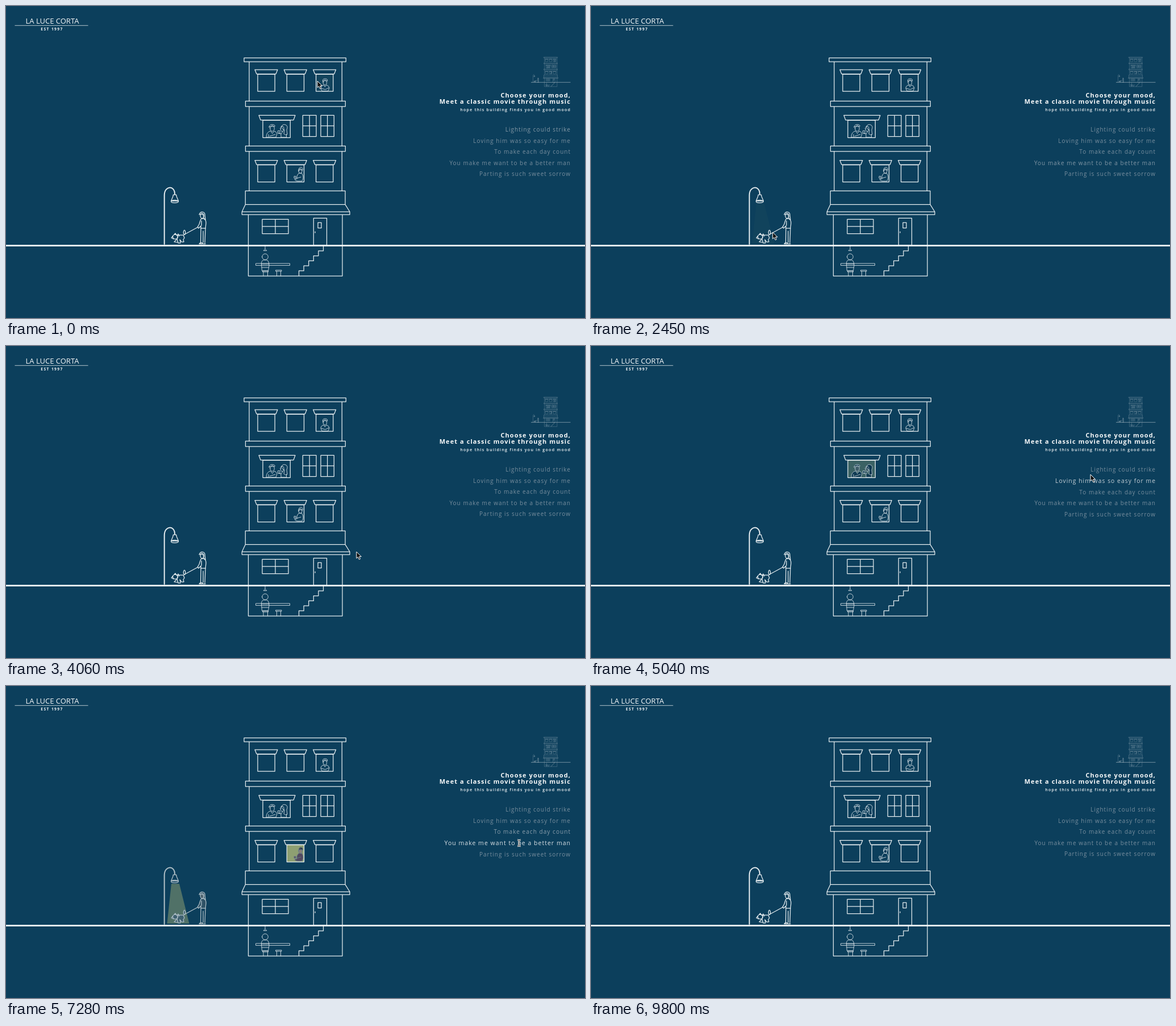
Animation of 1019 by 549 pixels, one loop 9940 ms. Source, as an HTML page:

```html
<!DOCTYPE html>
<html lang="en">
<head>
<meta charset="utf-8">
<title>Mood building</title>
<style>
  html, body { margin: 0; width: 100%; height: 100%; overflow: hidden; background: #0c3f5c; }
  svg { display: block; width: 100%; height: 100%; }
  text { font-family: "Open Sans", "Noto Sans", sans-serif; fill: #f6f8f9; }
  .art { fill: none; stroke: #e6edf0; stroke-width: 1.25; stroke-linejoin: round; stroke-linecap: round; }
  .fine { stroke-width: .8; }
  .bold { stroke-width: 2; }
  .thumb, .thumb * { stroke: #8fa5b3; stroke-width: 3.4; }
  .thumb .fine { stroke-width: 2; }
</style>
</head>
<body>
<svg id="stage" viewBox="0 0 1019 549" xmlns="http://www.w3.org/2000/svg"></svg>
<script>
const LOOP = 9940, STEP = 70;
const FADE = 550, ROW_FADE = 300, SETTLE = 100;
const ROW_TOP = 218, ROW_GAP = 19.4;
const GLOW = '#dcda80';

const rows = [
  'Lighting could strike',
  'Loving him was so easy for me',
  'To make each day count',
  'You make me want to be a better man',
  'Parting is such sweet sorrow'
];

// where the pointer rests on a mood, in the house and in the list
const house = [[548, 132], [485, 217], [510, 295], [318, 400], [455, 446]];
const list = rows.map((_, i) => [903, ROW_TOP + i * ROW_GAP]);
const visit = (row, place, on, off) => ({ row, on, off, at: place[row] });

const visits = [
  visit(0, house, -60, 1210),
  visit(1, house, 1230, 1760),
  visit(3, house, 2400, 2830),
  visit(4, house, 2860, 3500),
  visit(1, list, 4870, 5150),
  visit(0, list, 5180, 6020),
  visit(2, list, 6140, 7050),
  visit(3, list, 7070, 7860),
  visit(4, list, 7910, 8500),
  visit(4, house, 8850, 9150),
  { on: 9600, off: LOOP, at: [498, 552] }
];
visits[4].at = [879, 226]; // rests in the gap above its line

const ease = k => k * k * (3 - 2 * k);
const clamp = k => Math.max(0, Math.min(1, k));

// ---- shapes ----
const path = (d, extra = '') => `<path d="${d}" ${extra}/>`;
const box = (x, y, r, b) => `M${x} ${y}H${r}V${b}H${x}Z`;
const oval = (x, y, rx, ry = rx) => `M${x - rx} ${y}a${rx} ${ry} 0 1 0 ${2 * rx} 0a${rx} ${ry} 0 1 0 ${-2 * rx} 0Z`;
const cross = (x, y, r, b) => box(x, y, r, b) + `M${(x + r) / 2} ${y}V${b}M${x} ${(y + b) / 2}H${r}`;
const shade = (x, y, w, h = 7.5) => `M${x} ${y}h${w}l-3 ${h}h${6 - w}Z`;

const awnings = [112, 271.5].flatMap(y => [0, 1, 2].map(i => {
  const x = 438 + i * 51.3;
  return shade(x, y, 40) + box(x + 5, y + 8, x + 35.2, y + 38);
}));
const walls = [98, 177, 255.5].map(y => `M428 ${y}v69.500M591.300 ${y}v69.500`);
const ledges = [167.3, 246.3].map(y => box(421.5, y, 597.3, y + 9.5));
const stairs = 'M558.500 422' + 'v8.800h-8.600'.repeat(5) + 'V475';
const counter = box(440, 453, 499.5, 456.5) + box(475, 464.8, 485, 466.8) + 'M476.500 467v8M483.500 467v8';

const building = path([
  box(419, 91.3, 598.3, 98), ...walls, ...ledges, ...awnings,
  box(421.3, 325.3, 597, 349.3), 'M421.300 349.300L415.300 362M597 349.300L605 362',
  box(415.3, 362, 605, 367), 'M426.500 367V475H592V367',
  shade(445, 192.3, 64, 8.3), box(452, 201, 500.3, 231.5),
  cross(522.3, 192.3, 546, 229.5), cross(554, 192.3, 577.3, 229.5),
  cross(451, 375.3, 497, 400.5),
  box(541.3, 373.3, 564.5, 421), box(549, 381, 555, 390.5), 'M544 397v2', stairs
].join('')) + path(counter, 'class="fine"');

// each figure: glow area and parts as [path, lit fill, line class]
const figures = [
  { glow: box(546, 119.8, 576, 150), ink: '#1c2c6e', parts: [
    [oval(561.3, 134.5, 3.2, 4.5), '#d9a98a'],
    ['M557.500 132.500q-1-4.500 4-4.500t4 4q-4-1.500-8 .5Z', '#2c3f8c'],
    ['M559 139q-5 1-5 6l2 4.500h11l2-5.500q-1-4-5-5l-2.500 3ZM555 145l7 2 6-3', '#2c3f94']
  ] },
  { glow: box(452, 201, 500.3, 231.5), ink: '#cfcfb4', parts: [
    [oval(468.5, 215.5, 3.8, 5) + oval(486, 216, 3, 4.5), '#e6bf98'],
    ['M463 213q1-5 6-4.500t4 3.500q-5-1-10 1Z', '#172027'],
    ['M465 220q-7 2-7 11h17l2-6q-1-4-5-5l-3 4ZM462 230v-4M464 229l10-3', '#1d2a33'],
    ['M485 212q2-5 7-3t2 9l1 8q-4 2-6-1l1-7q-5-1-5-6Z', '#172027'],
    ['M487 221l-3 4-4-1M484 225v6h9.500v-5M478.500 220v4h3.500v-4Z', '#252b33']
  ] },
  { glow: box(494.8, 279.5, 524.3, 309.3), ink: '#384255', parts: [
    [oval(518, 290.5, 3, 4), '#d9a98a'],
    ['M515 289q0-5 4-5t3 5q-3-2-7 0Z', '#3b2f31'],
    ['M516 294q-5 3-4 10l-4 1q1 3 5 3h8q4-7 0-13ZM512 303l7-2M507 300v3h3v-3Z', '#7f5061']
  ] },
  { glow: 'M291 348h14l17.500 70h-39Z', ink: '#8c9294', parts: [
    ['M278.700 419V333C278.700 316 297 315 297 331', 'none', 'bold'],
    ['M294.500 332h5l1 4 3 7h-13l3-7Z' + oval(297, 344, 6.5, 2.3), 'none', ''],
    [oval(345, 369, 3, 4.5), '#c9a189', ''],
    ['M340 367q2-5 6-4.500t4 5l1 9-3-3-1-7Z', '#565c60', ''],
    ['M343 375q-2 5-3 9l-3 5 2 2 4-4v4h8l1-9q0-7-5-8ZM344 378v8', '#777b7b', ''],
    ['M343 391l-.500 26M347 396v20M351 391l-1 26M340 418.500q2-3 6-1.500v1.500ZM347 418.500h4', '#56656e', ''],
    ['M338 389L314 402', 'none', ''],
    ['M303 403h9l2 5-2 3 1 4h-4l-3-4 1 6h-4l-2-7Z' + oval(314, 398.5, 1.7, 4), '#aaa99c', ''],
    [oval(298, 406, 4.5, 4) + 'M294 404l-3 4 4 2M296 402l2-2 3 4 2-3 2 4M300 411l-4 4 6 1', '#aaa99c', '']
  ] },
  { glow: 'M453.500 431h5l9.500 21h-24Z', ink: '#8f9a9e', parts: [
    ['M456 423v4.500l-2.800 3h5.600l-2.800-3', 'none'],
    [oval(456, 441.3, 5.3), '#1a2329'],
    ['M453 447q-4 1-3.500 8l1 11h11l1.500-9q0-9-4-10ZM450 454h13M450 460h12', '#34495a'],
    [box(452, 466, 461.5, 468) + 'M453 468v7M460.500 468v7', 'none']
  ] }
];

const lines = f => f.parts.map(([d, , c = 'fine']) => path(d, `class="${c}"`)).join('');
const litParts = f => path(f.glow, `fill="${GLOW}" stroke="none"`) +
  f.parts.map(([d, fill, c = 'fine']) => path(d, `fill="${fill}" class="${c}"`)).join('');
const label = (x, y, size, weight, gap, anchor, str, extra = '') =>
  `<text x="${x}" y="${y}" font-size="${size}" font-weight="${weight}" letter-spacing="${gap}" text-anchor="${anchor}" ${extra}>${str}</text>`;

const beamShape = 'M-3-5.500Q0-5.500 0-3.500Q0-5.500 3-5.500M0-3.500V3.500M-3 5.500Q0 5.500 0 3.500Q0 5.500 3 5.500';

const stage = document.getElementById('stage');
stage.innerHTML =
  label(81.5, 30.6, 13, 400, 0, 'middle', 'LA LUCE CORTA') +
  path('M15.500 34.300H144.500', 'stroke="#c9d4da" stroke-width=".9"') +
  label(81, 43.3, 6.6, 700, 1.45, 'middle', 'EST 1997') +
  `<g class="art">${figures.map(f =>
    `<g class="lit" stroke="${f.ink}" opacity="0">${litParts(f)}</g><g class="line">${lines(f)}</g>`).join('')}${building}</g>` +
  path('M0 421.700H1019', 'stroke="#fafcfc" stroke-width="2.700"') +
  `<g class="art thumb" opacity=".75" transform="translate(889.9 77.7) scale(.135)">${building}${figures.map(lines).join('')}</g>` +
  path('M924 134.300H993.500', 'stroke="#8fa5b3" stroke-width=".8"') +
  label(994, 161, 11, 700, 1.07, 'end', 'Choose your mood,') +
  label(994, 171.8, 11, 700, 1.07, 'end', 'Meet a classic movie through music') +
  label(994.3, 184.7, 7, 600, 1.3, 'end', 'hope this building finds you in good mood') +
  rows.map(r => label(994, 0, 10, 500, 1.02, 'end', r, 'class="row"')).join('') +
  `<g id="pointer">
    ${path('M0 0V11.500L2.700 9.200 4.600 13.600 6.700 12.700 4.900 8.500H8.500Z', 'id="arrow" fill="#111" stroke="#fff"')}
    <g id="beam" fill="none">
      ${path(beamShape, 'stroke="#fff" stroke-width="2.6"')}${path(beamShape, 'stroke="#222" stroke-width=".9"')}
    </g>
  </g>`;

const all = s => [...stage.querySelectorAll(s)];
const lit = all('.lit'), plain = all('.line'), texts = all('.row');
const [pointer, arrow, beam] = ['pointer', 'arrow', 'beam'].map(id => document.getElementById(id));

// how strongly a mood shows at time t: rises while visited, then falls
function level(row, t, fade) {
  const strengths = visits.filter(v => v.row === row && t >= v.on).map(v =>
    clamp((Math.min(t, v.off) - v.on) / fade) - Math.max(0, t - v.off) / fade);
  return ease(clamp(Math.max(0, ...strengths)));
}

function pointAt(t) {
  const next = visits.findIndex(v => v.on + SETTLE > t);
  if (next < 0) return visits[visits.length - 1].at;
  if (next === 0) return visits[0].at;
  const a = visits[next - 1], b = visits[next];
  const from = a.off - SETTLE, to = b.on + SETTLE;
  const k = ease(clamp((t - from) / (to - from)));
  return a.at.map((v, i) => v + (b.at[i] - v) * k);
}

const mix = (from, to, k) => `rgb(${from.map((v, i) => Math.round(v + (to[i] - v) * k))})`;

function draw(t) {
  let push = 0;
  texts.forEach((el, i) => {
    const glow = level(i, t, FADE);
    lit[i].setAttribute('opacity', glow);
    plain[i].setAttribute('opacity', 1 - glow);

    const k = level(i, t, ROW_FADE);
    el.setAttribute('y', ROW_TOP + 3.4 + i * ROW_GAP + push + k * .6);
    el.setAttribute('font-size', 10 + k * .65);
    el.style.fill = mix([120, 142, 158], [246, 248, 249], k);
    push += k * 1.2;
  });

  const [x, y] = pointAt(t);
  const overText = x > 860 && list.some(p => Math.abs(y - p[1]) < 6.5);
  pointer.setAttribute('transform', `translate(${x} ${y})`);
  arrow.style.display = overText ? 'none' : '';
  beam.style.display = overText ? '' : 'none';
}

const start = performance.now();
function tick(now) {
  const t = Math.max(0, now - start) % LOOP;
  draw(Math.min(LOOP - 2 * STEP, Math.floor(t / STEP) * STEP));
  requestAnimationFrame(tick);
}
draw(0);
requestAnimationFrame(tick);
</script>
</body>
</html>
```
